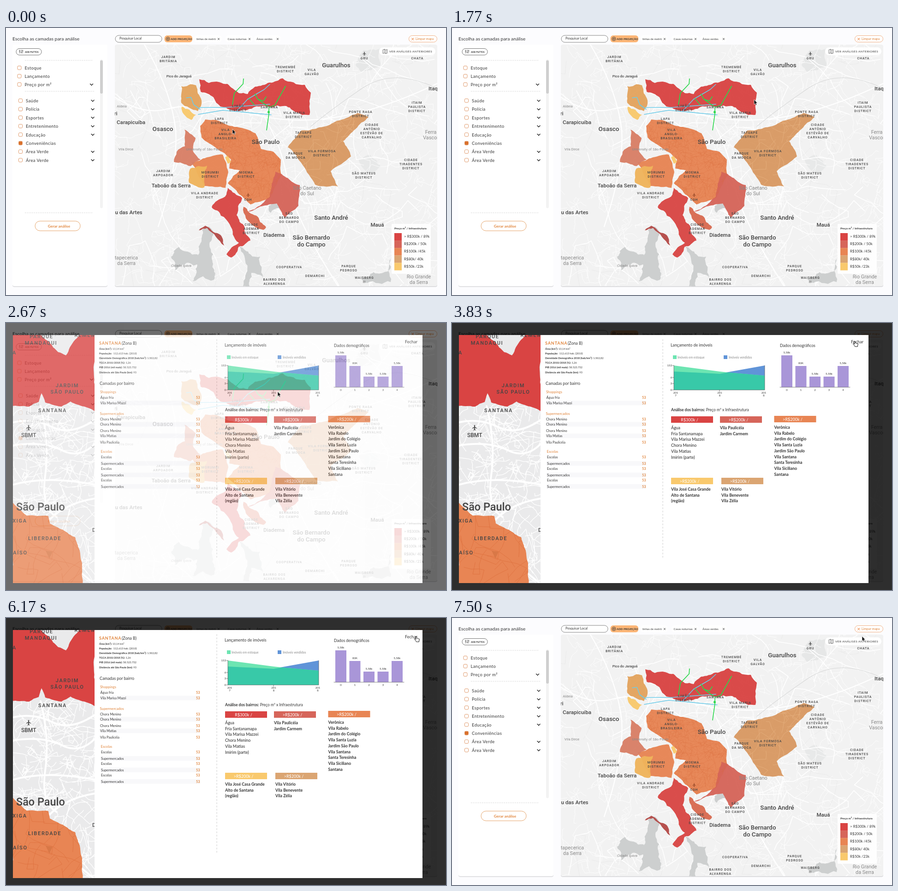
An HTML page that plays this animation: 954x578 px, repeating every 7.53 s.

```html
<!DOCTYPE html>
<html lang="pt">
<head>
<meta charset="utf-8">
<title>Análise de camadas</title>
<style>
html, body { margin: 0; width: 100%; height: 100%; overflow: hidden; background: #fcfcfe; }
svg { position: absolute; left: 0; top: 0; width: 100vw; height: 100vh; }
text { font-family: Lato, "Open Sans", sans-serif; fill: #333; white-space: pre; }
.map text { font-family: Roboto, "Open Sans", sans-serif; font-weight: 500; fill: #444; }
.caps { letter-spacing: .9px; }
.spaced { letter-spacing: .45px; }
.wide { letter-spacing: 1.7px; }
.m { font-weight: 500; }
.b { font-weight: 700; }
.mid { text-anchor: middle; }
.end { text-anchor: end; }
text.or { fill: #e08339; }
text.wh { fill: #fff; }
text.soft, .map text.soft { fill: #888; font-weight: 400; }
.line { fill: none; stroke-linejoin: round; stroke-linecap: round; }
#dim, #modal, #cursor, #arrow, #hand { animation: dim 7530ms infinite; }
#modal { animation-name: modal; }
#cursor { animation-name: move; will-change: transform; }
#arrow { animation-name: arrow; animation-timing-function: step-end; }
#hand { animation-name: hand; animation-timing-function: step-end; }
@keyframes dim {
  0%, 33.4% { opacity: 0; animation-timing-function: ease-out; }
  37.4%, 84.66% { opacity: 1; animation-timing-function: ease-out; }
  88.65%, 100% { opacity: 0; }
}
@keyframes modal {
  0%, 33.4% { opacity: 0; animation-timing-function: cubic-bezier(0, 0, .35, 1); }
  37.4%, 84.66% { opacity: 1; animation-timing-function: linear; }
  88.65%, 100% { opacity: 0; }
}
@keyframes move {
  0%, 3.3% { transform: translate(491px, 219px); animation-timing-function: ease-in-out; }
  18.6%, 23.9% { transform: translate(655px, 155px); animation-timing-function: ease-in-out; }
  31.2%, 40.5% { transform: translate(589px, 148.5px); animation-timing-function: ease-in-out; }
  49.1%, 74.4% { transform: translate(873px, 39px); animation-timing-function: ease-in-out; }
  79.7%, 100% { transform: translate(889px, 39.5px); }
}
@keyframes arrow { 0% { opacity: 1; } 49.1% { opacity: 0; } 85%, 100% { opacity: 1; } }
@keyframes hand { 0% { opacity: 0; } 49.1% { opacity: 1; } 85%, 100% { opacity: 0; } }
</style>
</head>
<body>
<svg id="main" viewBox="0 0 954 578"></svg>
<svg id="over" viewBox="0 0 954 578"></svg>
<svg viewBox="0 0 954 578">
  <g id="cursor">
    <path id="arrow" d="M0 0V10.5L2.4 8.4L4 12L5.8 11.2L4.2 7.7H7.4Z" fill="#111" stroke="#fff" stroke-width=".7"/>
    <path id="hand" d="M-1 1Q0-.6 1.2 1L2 4.6L3.2 4.2L4.2 5L5.4 4.8L6 5.6Q7.4 5.2 7.3 7L6.6 9.8L6.4 12H.8L-1.8 8.2Q-4.4 6-3.2 5.4Q-2 5 0 7Z" fill="#fff" stroke="#111"/>
  </g>
</svg>
<script>
const text = (x, y, s, size, cls = '') => `<text x="${x}" y="${y}" font-size="${size}" class="${cls}">${s}</text>`;
const lines = (x, y, s, size, gap, cls) => s.split('|').map((l, i) => text(x, y + i * gap, l, size, cls)).join('');
const rect = (x, y, w, h, fill, r = 0, more = '') => `<rect x="${x}" y="${y}" width="${w}" height="${h}" rx="${r}" fill="${fill}" ${more}/>`;
const pill = (x, y, w, h, stroke) => rect(x, y, w, h, '#fff', Math.min(h / 2, 10.5), `stroke="${stroke}" stroke-width=".9"`);
const poly = (pts, fill, more = '') => `<polygon points="${pts}" fill="${fill}" ${more}/>`;
const line = (d, color, w = 1, more = '') => `<path class="line" d="${d}" stroke="${color}" stroke-width="${w}" ${more}/>`;
const dash = (d, gap = '2 2') => line(d, '#c9c9c9', .9, `stroke-dasharray="${gap}" style="stroke-linecap:butt"`);
const cross = (x, y, r, color, w = 1) => line(`M${x - r} ${y - r}l${2 * r} ${2 * r}m0 ${-2 * r}l${-2 * r} ${2 * r}`, color, w);
const plane = (x, y, k, color) => `<path transform="translate(${x} ${y}) scale(${k})" fill="${color}" d="M0-5L1-4V-1L5 1.5V2.5L1 1.2V4L2.4 5V6L0 5.4L-2.4 6V5L-1 4V1.2L-5 2.5V1.5L-1-1V-4Z"/>`;
const random = seed => () => (seed = (seed * 16807) % 2147483647) / 2147483647;

// Seeded wandering streets that now and then turn at a right angle.
function streets(seed, x, y, w, h, count, step) {
  const rnd = random(seed);
  let d = '';
  for (let i = 0; i < count; i++) {
    let a = rnd() * 6.28;
    d += `M${(x + rnd() * w).toFixed(1)} ${(y + rnd() * h).toFixed(1)}`;
    for (let k = 3 + rnd() * 6; k > 0; k--) {
      a += (rnd() - .5) * .9 + (rnd() < .2 ? 1.57 : 0);
      const l = step * (.4 + rnd());
      d += `l${(l * Math.cos(a)).toFixed(1)} ${(l * Math.sin(a)).toFixed(1)}`;
    }
  }
  return d;
}

// Natural border through a few corners, by midpoint displacement.
function rough(corners, amount = .12) {
  const pts = corners.split(' ').map(p => p.split(',').map(Number));
  const rnd = random(corners.length * 977);
  const split = (a, b) => {
    const dx = b[0] - a[0], dy = b[1] - a[1];
    if (Math.hypot(dx, dy) < 7) return [a];
    const k = (rnd() - .5) * 2 * amount;
    const m = [(a[0] + b[0]) / 2 - dy * k, (a[1] + b[1]) / 2 + dx * k];
    return [...split(a, m), ...split(m, b)];
  };
  return pts.flatMap((p, i) => split(p, pts[(i + 1) % pts.length])).map(p => p.map(v => v.toFixed(1))).join(' ');
}

// Each row: x, y and the text, with | between lines.
const labels = (rows, size, gap, cls = '') => rows.trim().split('\n').map(row => {
  const [, x, y, s] = row.trim().match(/^(\d+) (\d+) (.+)$/);
  return lines(+x, +y, s, size, gap, cls + ' mid');
}).join('');

const red = '#d94443', brick = '#d6655a', orange = '#e88554', tan = '#dba572', yellow = '#f9c96d';
const center = rough('421,212 432,198 495,214 541,228 553,262 580,268 596,285 597,320 573,368 530,382 481,336 507,308 484,304 488,285 424,237', .06);
const east = rough('611,258 640,222 762,184 786,193 731,245 748,278 704,310 720,343 670,339', .08);

const zones = () => [
  [red, rough('419,111 462,117 480,121 505,141 524,143 540,127 572,118 600,109 648,123 661,140 658,188 600,169 510,178 465,170 450,150 422,138')],
  ['#e3a45e', rough('380,126 412,124 424,157 416,180 380,162')],
  [yellow, rough('381,170 412,188 402,199 385,186')],
  [orange, center],
  [orange, rough('402,290 470,274 482,312 476,346 430,342', .07)],
  ['#f0b55c', rough('400,304 436,298 430,345 397,335')],
  ['#d97f66', rough('387,220 411,238 406,268 422,285 400,299 364,290 370,268 388,256')],
  [brick, rough('584,311 637,340 634,385 605,411 587,380 525,398 572,365', .08)],
  ['#d99a63', east],
  ['#d94745', rough('481,346 512,368 500,405 530,460 488,497 478,490 505,465 485,425 446,388 475,365')],
  ['#d96c52', rough('515,387 564,431 558,437 520,412')],
  ['#b54b48', rough('418,438 432,428 462,446 473,471 455,452 436,433')],
  [yellow, '475,280 481,276 488,290 481,294']
].map(([color, pts]) => poly(pts, color, 'opacity=".96"')).join('');

const water = () => [
  '425,437 440,430 449,440 441,468 449,490 451,545 405,548 415,495',
  '415,490 375,474 358,495 366,524 395,508 420,512',
  '505,473 530,490 551,495 557,540 532,530 528,559 514,559',
  '834,500 828,527 770,543 783,552 834,550',
  '570,385 584,377 593,390 574,400'
].map(p => poly(rough(p, .2), '#cdcfcf')).join('');

const districtNames = `
  352 65 JARDIM|BRITÂNIA
  606 87 TREMEMBÉ|DISTRICT
  663 93 VILA|GALVÃO
  892 68 CHATA
  891 164 ITAIM|PAULISTA|DISTRICT
  769 184 PONTE RASA|DISTRICT
  793 212 CIDADE|ANTÔNIO|ESTÊVÃO DE|CARVALHO
  878 288 CIDADE|TIRADENTES|DISTRICT
  776 317 SÃO MATEUS|DISTRICT
  685 269 VILA FORMOSA|DISTRICT
  628 274 PARQUE|DA MOOCA
  645 229 TATUAPÉ|DISTRICT
  625 186 VILA MARIA|DISTRICT
  571 174 SANTANA
  503 171 LIMÃO|DISTRICT
  463 199 LAPA|DISTRICT
  476 223 VILA|ANGLO-|BRASILEIRA
  341 312 JARDIM|ARPOADOR
  443 315 MORUMBI|DISTRICT
  521 315 MOEMA|DISTRICT
  431 360 VILA ANDRADE|DISTRICT
  614 404 SÃO|BERNARDO|DO CAMPO
  532 428 CIDADE|ADEMAR|DISTRICT
  614 520 COOPERATIVA
  670 539 DEMARCHI
  743 518 PARQUE|PEDROSO
  777 543 WAISBERG|II
  582 547 BAIRRO DOS|ALVARENGA
  777 68 GRU
  525 374 CGH`;
const cities = `
  563 251 São Paulo
  716 85 Guarulhos
  705 415 Santo André
  662 458 São Bernardo|do Campo
  340 223 Osasco`;
const towns = `
  358 345 Taboão da Serra
  271 208 Carapicuíba
  581 452 Diadema
  805 430 Mauá
  266 403 u das Artes
  926 135 Itaq
  238 189 ri`;
const suburbs = `
  653 350 São Caetano|do Sul
  921 229 Ferra|Vascor
  895 542 Rio Grande|da Serra
  261 501 tapecerica|da Serra`;
const places = `
  251 172 Aldeia
  260 265 Vila Dirce
  380 517 Cidade Ipava
  430 265 University of São Paulo`;

const map = () => `<clipPath id="mapClip">${rect(236, 36, 699, 523, '#000', 4)}</clipPath>
  <clipPath id="center">${poly(center, '#000')}</clipPath>
  <clipPath id="east">${poly(east, '#000')}</clipPath>
  ${rect(236, 37.5, 699, 523, '#d5d5d8', 4)}
  <g class="map" clip-path="url(#mapClip)">
    ${rect(236, 36, 699, 523, '#f2f2f2')}
    ${poly(rough('758,80 775,48 810,45 812,82 770,95'), '#e6e7e7')}${poly(rough('765,285 790,275 812,300 785,315'), '#e8e9e9')}
    ${line(streets(11, 236, 36, 699, 523, 30, 22), '#e4e4e5', .6)}
    ${line(streets(7, 236, 36, 699, 523, 620, 9), '#fff', .8)}
    ${line(streets(29, 236, 36, 699, 523, 60, 26), '#fff', 1.6)}
    ${line('M236 150Q300 190 350 175T560 192T935 120M560 192Q600 260 610 330T720 559M300 36Q350 120 365 200T330 430', '#fff', 2.2)}
    ${line('M661 213Q700 180 770 132T935 131', '#d6d7d7', 1.1)}
    ${water()}${zones()}
    ${line(streets(5, 420, 200, 180, 185, 330, 7), '#d66c3c', .5, 'clip-path="url(#center)" opacity=".6"')}
    ${line(streets(3, 610, 180, 180, 165, 35, 14), '#e6b07e', .8, 'clip-path="url(#east)"')}
    ${line('M391 151L401 150L407 166L421 176M417 187L470 178L575 188M420 172L475 172L572 165M500 180L524 154L560 133L572 122', '#6ccbe8', 1.6)}
    ${line('M515 110L514 121L495 141L491 166M606 126L583 167L570 172V186L565 221M527 153L538 166M540 143L546 154L558 158L564 149M546 154L568 170', '#2bd84c', 1.7)}
    <circle cx="569.5" cy="182" r="2.5" fill="#2bd84c"/>
    ${plane(777, 55, .75, '#555')}${plane(525, 361, .75, '#9c4d2c')}
    ${labels(districtNames, 7, 9, 'caps')}${labels(cities, 13.4, 15)}${labels(towns, 11.6, 12)}
    ${labels(suburbs, 10.8, 12, 'soft')}${labels(places, 7.7, 9, 'soft')}${text(375, 107, 'Pico do Jaraguá', 7.5, 'mid')}
  </g>`;

const legend = () => rect(836, 424, 85, 108, '#fff', 2, 'opacity=".92"') + text(842, 436, 'Preço m² / Infraestrutura', 6.3, 'b') +
  [[red, '&gt; R$300k / 89k'], [brick, 'R$200k / 50k'], [orange, 'R$100k /45k'], [tan, 'R$80k/ 40k'], [yellow, 'R$50k /23k']]
    .map(([c, s], i) => rect(842, 444 + i * 16.1, 16, 16.2, c) + text(863, 454 + i * 16.2, s, 8)).join('');

const item = (x, y, s, open, on) => rect(x, y - 7.8, 8, 8, on ? '#d9702b' : '#fff', 2, 'stroke="#e09a6c"') +
  text(x + 15.5, y, s, 9.4, 'spaced') + (open ? line(`M${x + 157.5} ${y - 5}l3 3l3-3`, '#222', 1.4) : '');

const sidebar = () => text(14, 27, 'Escolha as camadas para análise', 10.4) +
  rect(14, 37.5, 206, 523, '#d8d8db', 4) + rect(14, 36, 206, 523, '#fff', 4) +
  pill(22, 44.5, 55, 14, '#666') + text(41, 53.5, 'ADD FILTTOS', 4.7, 'b') +
  line('M29.5 47.5v7M33 47.5v7M36 47.5v7M28.5 50h2M32 53h2M35 49.5h2', '#444', .8) +
  dash('M41 70H189') + dash('M41 137H193') + dash('M41 400H189') +
  rect(204, 68, 6, 322, '#f3f3f3', 3) + rect(204, 70, 6, 72, '#cfcfcf', 3) +
  ['Estoque', 'Lançamento', 'Preço por m²'].map((s, i) => item(25, 90 + i * 18, s, i == 2)).join('') +
  ['Saúde', 'Polícia', 'Esportes', 'Entretenimento', 'Educação', 'Conveniências', 'Área Verde', 'Área Verde']
    .map((s, i) => item(27.5, 161 + i * 18.4, s, i != 5, i == 5)).join('') +
  pill(63, 418, 98, 21, '#e39a5a') + text(115, 432, 'Gerar análise', 8.4, 'b or mid');

const chip = (x, w, s) => rect(x, 16, w, 15, '#fff', 7) + text(x + 5, 25.8, s, 6.2) + cross(x + w - 7, 23.8, 1.7, '#333', .9);

const header = () => pill(237, 16, 101, 15, '#777') + text(246, 25.3, 'Pesquisar Local', 7.2) +
  rect(343.5, 16, 60.5, 15, '#fcb677', 6) + '<circle cx="351" cy="23.5" r="4" fill="none" stroke="#333" stroke-width=".9"/>' +
  line('M348.8 23.5h4.4M351 21.3v4.4', '#333', .9) + text(357, 25.9, 'ADD PROJEÇÃO', 6.1, 'b') +
  chip(408, 60, 'linhas de metrô') + chip(475.5, 59.5, 'Casas noturnas') + chip(538, 58, 'Áreas verdes') +
  pill(873.5, 16.5, 61, 14, '#f0a878') + cross(882, 24, 2.2, '#ee8d4f', 1.1) + text(888, 25.5, 'Limpar mapa', 7, 'or');

const history = () => rect(809, 42, 122, 17, '#fff', 8.5) +
  line('M817.5 47l3-1v8l-3 1zM820.5 46l3 1.5v8l-3-1.5M823.5 47.5l3-1v8l-3 1', '#555', .8) +
  text(831, 53, 'VER ANÁLISES ANTERIORES', 6.4, 'spaced');

document.getElementById('main').innerHTML = rect(0, 0, 954, 578, '#fcfcfe') + sidebar() + header() + map() + history() + legend();

const sideNames = `
  77 33 PARQUE
  76 47 MANDAQUI
  172 30 REMEM
  133 139 JARDIM
  133 153 SÃO PAULO
  101 193 SANTANA
  30 432 XIGA
  84 470 LIBERDADE
  31 501 AÍSO`;

const sideMap = () => {
  const south = rough('10,385 45,417 92,418 95,434 150,464 165,520 167,570 10,570', .05);
  return `<clipPath id="side">${rect(15, 26, 177, 537, '#000')}</clipPath><clipPath id="south">${poly(south, '#000')}</clipPath>
  <g class="map" clip-path="url(#side)">
  ${rect(15, 26, 177, 537, '#eaeaeb')}
  ${line(streets(17, 15, 150, 177, 413, 230, 10), '#fff', 1.3)}
  ${line('M15 215Q60 205 100 225T192 210M15 265Q80 255 120 275T192 262M75 180Q95 260 85 330T110 420M15 350Q90 330 192 350M192 380Q130 390 95 425T190 563', '#fff', 4)}
  ${poly(rough('10,20 70,20 113,63 130,70 150,36 165,20 198,20 198,193 140,170 120,181 85,172 77,152 71,171 50,181 10,180', .06), red)}
  ${poly(south, orange)}
  ${line(streets(23, 15, 400, 150, 160, 30, 22), '#df7341', .9, 'clip-path="url(#south)"')}
  ${plane(49, 226, 1.1, '#555')}${poly('86,493 101,495 94,510', '#d97847')}
  ${labels(sideNames, 11, 14, 'wide')}${text(14, 68, 'A', 11)}${text(187, 452, 'D', 11)}
  ${text(33, 247, 'SBMT', 12)}${text(22, 406, 'São Paulo', 23.4)}</g>`;
};

const facts = [['Área (km²):', '13,14 km²'], ['População:', ' 112.613 hab. (2010)'], ['Densidade Demográfica 2018 (hab/km²):', '1.502,82'],
  ['TGCA 2010/2018 (%):', '1,26'], ['PIB 2016 (mil reais):', '58.523.732'], ['Distância até São Paulo (km):', '93']];

// Every second row sits off the even spacing by the given shift.
const rows = (x, y, title, names, shift) => text(x, y, title, 7.7, 'or') + names.split('|').map((s, i) => {
  const ry = y + 12.2 + i * 12.5 + (i % 2) * shift;
  return (i % 2 ? rect(205, ry - 8, 216, 10, '#f8f8fa') : '') + text(x + .5, ry, s, 7.3) + text(412, ry, '53', 7.3, 'b or');
}).join('');

const report = () => text(202, 47, 'SANTANA', 9, 'b or caps') + text(251, 46.5, '(Zona B)', 8.8) +
  facts.map(([k, v], i) => text(202, 58 + i * 10.1, `<tspan class="b">${k}</tspan> ${v}`, 5.7)).join('') +
  text(203, 134, 'Camadas por bairro', 8.8) +
  rows(204, 151.5, 'Shoppings', 'Água fria|Vila Marisa Mazzi', 0) +
  rows(203.5, 199, 'Supermercados', 'Chora Menino|Chora Menino|Chora Menino|Vila Matias|Vila Paulicéia', -1.4) +
  rows(205.5, 280.8, 'Escolas', 'Escolas|Supermercados|Escolas|Supermercados|Escolas|Supermercados', 1.3) +
  dash('M457 35V510', '4 3');

const chart = () => text(474, 51, 'Lançamento de imóveis', 8.8) +
  rect(479, 70, 8, 8, '#6de5b2') + text(489, 76.5, 'Imóveis em estoque', 6.7, 'soft') +
  rect(589, 70, 8, 8, '#6094d8') + text(600, 76.5, 'Imóveis vendidos', 6.7, 'soft') +
  poly('575,110 600,106 678,92 678,145 575,145', '#6094d8') + poly('481,92 580,105 598,107 678,114 678,145 481,145', '#6de5b2') +
  poly('481,105 580,110 598,107 678,114 678,145 481,145', '#38c9a8') +
  line('M481 92V145H678V92M478 92h3M478 118h3M478 131h3M478 145h3M580 145v3', '#555', .7) +
  text(477, 94, 153, 6, 'end') + [6, 3, 0].map((s, i) => text(477, 120 + i * 13.3, s, 6, 'end')).join('') +
  [7, 8, 8].map((n, i) => lines(485 + i * 95.5, 153, '201|' + n, 6, 6.3, 'mid')).join('');

const bars = () => text(711, 52, 'Dados demográficos', 8.6) +
  [3, 2, 1, 1, 2].map((n, i) => {
    const x = 714 + i * 30.5, h = n * 23;
    return rect(x, 139 - h, 24, h, '#a996d8') + text(x + 12, 135 - h, i == 1 ? '80K' : '5,58k', 6, 'mid') + text(x + 12, 147, i, 6, 'mid');
  }).join('') + line('M711 139H863', '#666', .8);

const group = (x, y, fill, label, names, cls = 'b') => rect(x, y, 91, 14, fill) + text(x + 40, y + 10.5, label, 9, 'wh mid') +
  lines(x, y + 28, names, 8.8, 12.7, cls);

const price = '&gt;R$200k /';
const districts = () => text(475, 191, '<tspan class="b">Análise dos bairros:</tspan> Preço m² x Infraestrutura', 8.5) +
  group(475, 202, red, 'R$300k /', 'Água|Fria Santanamapa|Vila Marisa Mazzei|Chora Menino|Vila Matias|Imirim (parte)', 'm') +
  group(581, 202, brick, price, 'Vila Paulicéia|Jardim Carmem') +
  group(698.5, 201, orange, price, 'Verônica|Vila Rabelo|Jardim do Colégio|Vila Santa Luzia|Jardim São Paulo|Vila Santana|Santa Teresinha|Vila Siciliano|Santana') +
  group(475, 335, yellow, price, 'Vila José Casa Grande|Alto de Santana|(região)') +
  group(584, 335, tan, price, 'Vila Vitório|Vila Benevente|Vila Zélia');

document.getElementById('over').innerHTML =
  '<path id="dim" fill="#000" fill-opacity=".82" fill-rule="evenodd" d="M0 0H954V578H0ZM15 26V563H903V26Z"/><g id="modal">' +
  rect(15, 26, 888, 537, '#fff') + sideMap() + report() + chart() + bars() + districts() + text(865, 44, 'Fechar', 9.2) + '</g>';
</script>
</body>
</html>
```
